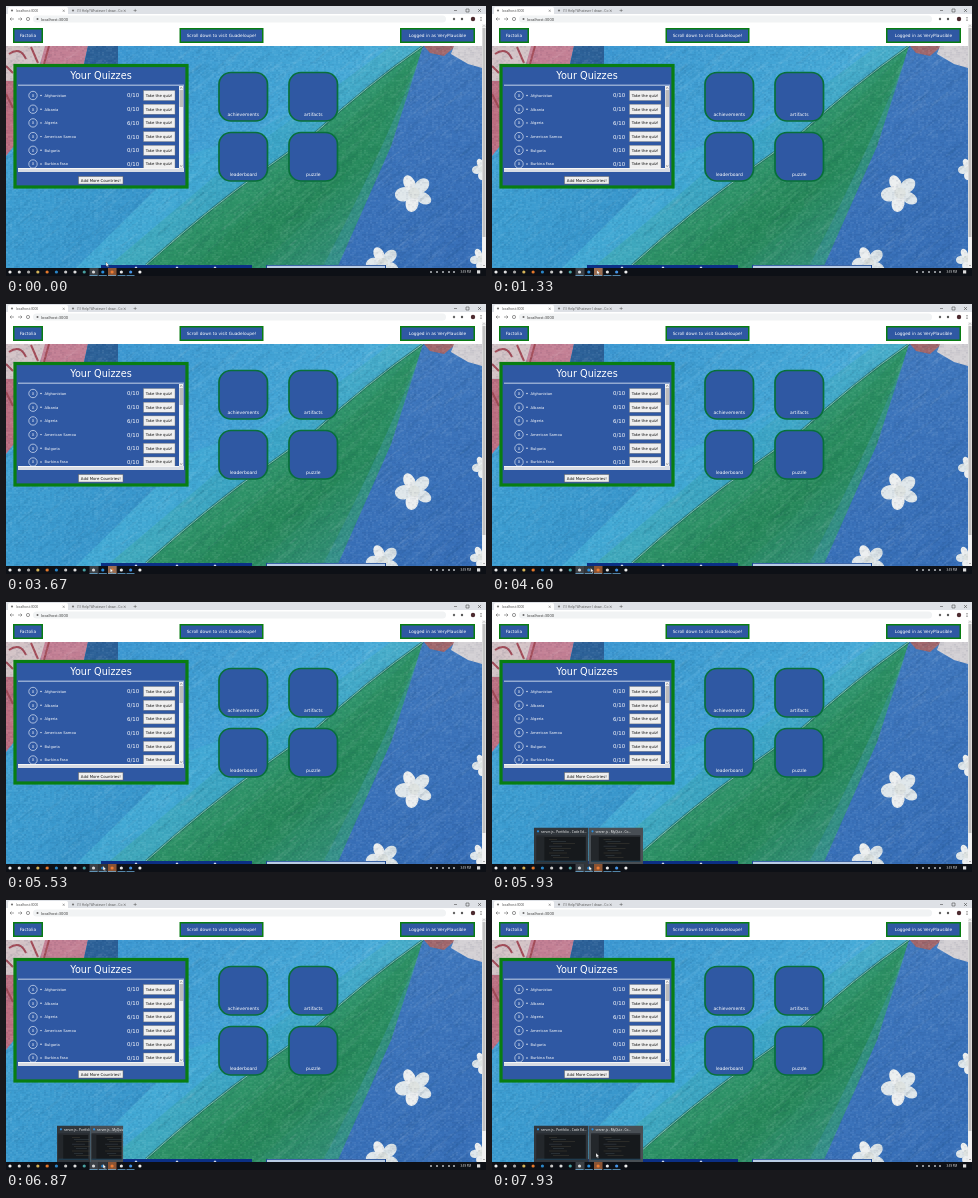
Recreate the animation shown at these times as an HTML page with a canvas. Size 480 by 270 pixels, loop 8000 ms.

```html
<!DOCTYPE html>
<html lang="en">
<head>
<meta charset="utf-8">
<title>Quiz dashboard</title>
<style>
html, body { margin: 0; width: 100%; height: 100%; overflow: hidden; background: #fff; }
canvas, body > svg { position: absolute; left: 0; top: 0; width: 100%; height: 100%; }
text { font-family: "DejaVu Sans", sans-serif; white-space: pre; }
.ui { font-family: "Open Sans", sans-serif; }
</style>
</head>
<body>
<canvas id="painting" width="480" height="270"></canvas>
<svg id="screen" viewBox="0 0 480 270" preserveAspectRatio="none"></svg>
<script>
const BLUE = '#2f58a3', GREEN = '#087d12';

// ---- painted backdrop ----
const ctx = document.getElementById('painting').getContext('2d');
let seed = 7;
const random = () => (seed = (seed * 16807) % 2147483647) / 2147483647;

function gradient(x0, y0, x1, y1, ...colors) {
  const g = ctx.createLinearGradient(x0, y0, x1, y1);
  colors.forEach((c, i) => g.addColorStop(i / (colors.length - 1), c));
  return g;
}
function shape(path, fill) {
  ctx.fillStyle = fill;
  ctx.fill(new Path2D(path));
}
function stroke(path, color, width) {
  ctx.strokeStyle = color;
  ctx.lineWidth = width;
  ctx.stroke(new Path2D(path));
}
function flower(x, y, r) {
  for (let i = 0; i < 5; i++) {
    const a = i * Math.PI * .4 + .5;
    ctx.fillStyle = i % 2 ? '#eceff0' : '#dfe7eb';
    ctx.beginPath();
    ctx.ellipse(x + Math.cos(a) * r * .55, y + Math.sin(a) * r * .55, r * .46, r * (.3 + i % 3 * .04), a, 0, 7);
    ctx.fill();
  }
  ctx.fillStyle = '#dde2e0';
  ctx.beginPath();
  ctx.arc(x, y, r * .3, 0, 7);
  ctx.fill();
}

function paint() {
  ctx.fillStyle = gradient(60, 40, 260, 262, '#3f9ed4', '#43aad6', '#3aa3cd');
  ctx.fillRect(0, 40, 476, 222);
  shape('M112 40H400L250 125L112 175Z', gradient(112, 40, 350, 120, '#3c98d2', '#46abd8'));
  shape('M0 183H150L70 262H0Z', gradient(0, 183, 110, 262, '#3d9fd3', '#3795cb'));
  // pale band, right sky and leaf
  shape('M418 40H385Q310 95 215 165L100 262H150L308 138Z', gradient(400, 45, 120, 262, '#48aecb', '#3aa4c6', '#40aabd'));
  shape('M416 40H476V262H325Z', gradient(400, 50, 470, 262, '#4079bf', '#3a72ba', '#376fb8'));
  const ridge = 'M417 40Q360 80 308 128L256 165Q200 205 140 259';
  shape(ridge + 'L138 262H331L385 140Z', gradient(290, 120, 370, 235, '#32986f', '#278a5c', '#338f78'));
  shape('M412 48Q360 100 308 146Q240 205 190 262H250Q335 190 398 82Z', '#24855455');
  shape('M414 52L385 140L331 262H316Q365 170 414 52Z', '#3a94a077');
  stroke(ridge, '#1c5f5499', 2.6);
  stroke(ridge, '#83c8b4', .9);
  // corner patches
  shape('M0 40H40L34 58H8V75H0Z', '#d3c3c6');
  shape('M39 40H82L78 58H34Z', '#c37f94');
  shape('M0 75H8V140L0 150Z', '#bc6e80');
  shape('M82 40H112V58H78Z', '#2c6198');
  stroke('M3 48Q14 40 20 53M25 41L32 57M43 40L38 58M0 60L7 67M0 88L7 102', '#a34c58', 2);
  shape('M418 40H450L438 50L424 47Z', '#a0666b');
  shape('M448 40H476V62L462 58L445 48Z', '#d3d0d4');
  flower(408, 187, 19);
  flower(377, 257, 17);
  flower(477, 163, 11);
  flower(475, 253, 11);

  // brush marks and canvas weave
  ctx.save();
  ctx.beginPath();
  ctx.rect(0, 40, 476, 222);
  ctx.clip();
  for (let i = 0; i < 900; i++) {
    const x = random() * 476, y = 40 + random() * 222, len = 5 + random() * 18;
    const color = random() < .5 ? 'rgba(255,255,255,.045)' : 'rgba(0,35,75,.045)';
    stroke(`M${x} ${y}l${-len} ${len * .8}`, color, 1 + random() * 2);
  }
  for (let y = 40; y < 262; y += 2)
    for (let x = 0; x < 476; x += 2) {
      const v = random() - .5;
      ctx.fillStyle = `rgba(${v > 0 ? '255,255,255' : '0,25,60'},${Math.abs(v) * .15})`;
      ctx.fillRect(x, y, 2, 1.5);
    }
  ctx.restore();
}

// ---- markup helpers ----
const rect = (x, y, w, h, fill, more = '') =>
  `<rect x="${x}" y="${y}" width="${w}" height="${h}" fill="${fill}" ${more}/>`;
const text = (x, y, size, label, more = '', fill = '#fff') =>
  `<text x="${x}" y="${y}" font-size="${size}" fill="${fill}" ${more}>${label}</text>`;
const dot = (x, y, r, fill) => `<circle cx="${x}" cy="${y}" r="${r}" fill="${fill}"/>`;
const line = (d, color, width = .6) =>
  `<path d="${d}" fill="none" stroke="${color}" stroke-width="${width}"/>`;
const MID = 'text-anchor="middle"';

const badge = (x, w, label) =>
  rect(x + .75, 22.75, w - 1.5, 13.5, BLUE, `stroke="${GREEN}" stroke-width="1.5"`) +
  text(x + w / 2, 31.2, 4.3, label, MID);

function browser() {
  return rect(0, 0, 480, 8, '#dee1e6') + rect(2, 1, 60, 8, '#fff', 'rx="1.5"') +
    rect(0, 8, 480, 10, '#fff') + rect(0, 18, 476, 22, '#fff') +
    dot(6, 4.5, 1.1, '#777') + text(10, 5.8, 3.3, 'localhost:3000', 'class="ui"', '#444') +
    text(56, 6, 4, '×', '', '#555') +
    dot(67, 4.5, 1.1, '#777') + text(71, 5.8, 3.3, '(1) Help! Whatever I draw - Co', 'class="ui"', '#555') +
    text(117, 6, 4, '×', '', '#555') + text(127, 6.2, 5, '+', '', '#444') +
    line('M448 4.5h3M460 3h3v3h-3zM472 3l3 3m0-3l-3 3', '#333', .5) +
    line('M8 13H4l1.5-1.5M4 13l1.5 1.5M12 13h4l-1.5-1.5M16 13l-1.5 1.5', '#666') +
    `<circle cx="22" cy="13" r="1.6" fill="none" stroke="#555" stroke-width=".6"/>` +
    rect(27, 9.5, 413, 7, '#f1f3f4', 'rx="3.5"') + dot(31.5, 13, 1, '#666') +
    text(35, 14.5, 4, 'localhost:3000', 'class="ui"', '#333') +
    dot(448, 13, 1.2, '#666') + dot(456, 13, 1.2, '#555') + dot(467, 13, 2.2, '#4d2b30') +
    [11.5, 13, 14.5].map(y => dot(475, y, .5, '#444')).join('') +
    rect(476, 18, 4, 244, '#f1f1f1') + rect(476.5, 22, 3, 209, '#c1c1c1') +
    line('M477 20.5l1-1 1 1M477 259l1 1 1-1', '#666', .5);
}

function quizPanel() {
  const scores = { Afghanistan: 0, Albania: 0, Algeria: 6, 'American Samoa': 0, Bulgaria: 0, 'Burkina Faso': 0 };
  const rows = Object.entries(scores).map(([country, score], i) => {
    const y = 89.5 + i * 13.7;
    return `<circle cx="27" cy="${y}" r="4.2" fill="none" stroke="#dce5f5" stroke-width=".7"/>` +
      text(27, y + 1.4, 3.8, 'X', MID) + dot(35, y, .7, '#fff') + text(38.5, y + 1.3, 3.7, country) +
      text(121, y + 1.9, 5.4, score + '/10') +
      rect(137.5, y - 5, 31.5, 10, '#efefef', 'stroke="#777" stroke-width=".4"') +
      text(153.2, y + 1.4, 3.85, 'Take the quiz!', MID, '#111');
  }).join('');
  return rect(9, 59.5, 172, 121.5, BLUE, `stroke="${GREEN}" stroke-width="3.2"`) +
    text(95, 73, 9.7, 'Your Quizzes', MID) +
    rect(12, 78.7, 166, .9, '#d5dff0') +
    `<svg x="12" y="79" width="161" height="83" viewBox="12 79 161 83">${rows}</svg>` +
    rect(173, 80, 4.5, 82, '#f1f1f1') + rect(173.5, 84, 3.5, 17, '#bcbcbc') +
    line('M174 82.5l1.2-1 1.2 1M174 159.5l1.2 1 1.2-1', '#555', .6) +
    rect(12, 162, 166, 4, '#d8dce4') + rect(12, 162, 161, 1, '#f5f5f5') +
    rect(72.5, 170.5, 44.5, 7.5, '#efefef', 'stroke="#666" stroke-width=".5"') +
    text(94.8, 175.7, 3.9, 'Add More Countries!', MID, '#111');
}

const tile = (x, y, label) =>
  rect(x, y, 48.5, 48.5, BLUE, 'rx="12" stroke="#08703a" stroke-width="1.7"') +
  text(x + 24.3, y + 43.3, 4.5, label, MID);

function nextSection() {
  return rect(95, 259, 151, 3, '#0b2f85') +
    [130, 171, 209].map(x => `<path d="M${x - 1.5} 262l1.5-1.7 1.5 1.7z" fill="#dce6f5"/>`).join('') +
    rect(260, 259, 120, 3, '#1c4894') + rect(261, 259.8, 118, 2.2, '#b9cce4');
}

function taskbar() {
  const icons = ['#eee', '#ddd', '#aaa', '#d5b45a', '#e5782b', '#2a86c8', '#c8c8c8', '#ddd',
    '#48a0a0', '#d8d8d8', '#2b8ede', '#ed7d35', '#e8e8e8', '#4595e8', '#f0f0f0'];
  return rect(0, 262, 480, 8, '#0d1016') +
    rect(83.5, 262, 9, 8, '#3c4147') + rect(102, 262, 8.5, 8, '#8c5433') +
    rect(0, 262, 9.2, 8, '#fff', 'id="hover" opacity=".15"') +
    icons.map((c, i) => dot(4 + i * 9.28, 266, 1.6, c)).join('') +
    [83.5, 92.8, 102, 111.5, 120.5].map(x => rect(x, 269.3, 8, .7, '#70b6e5')).join('') +
    [425, 431, 437, 443, 448].map(x => rect(x - .8, 265, 1.6, 2, '#b5b9bd', 'rx=".5"')).join('') +
    text(454.5, 267.2, 2.8, '3:39 PM', 'class="ui"') + rect(471, 264.3, 3.2, 3.2, '#ddd');
}

function pagePreview() {
  return `<g id="pagePreview">` + rect(58, 225.5, 57.5, 36.5, '#3a434b') +
    dot(62, 229.3, 1, '#b9c3cc') + text(65, 230.5, 3.2, 'localhost:3000', 'class="ui"') +
    rect(61, 233, 51, 27, '#386c8c') + rect(61, 233, 51, 4, '#68757f') +
    `<path d="M105 237L76 260H96Z" fill="#2f6c62"/>` +
    rect(62, 239, 19, 13, '#2c4c86', 'stroke="#1a5c40" stroke-width=".5"') +
    [0, 1, 2, 3].map(i => rect(84 + i % 2 * 8, 240 + (i >> 1) * 6.5, 5.5, 5.5, '#2c4c86', 'rx="1.5"')).join('') +
    '</g>';
}

function editorPreview(title, fill) {
  const code = Array.from({ length: 9 }, (_, i) =>
    rect(15 + i % 3 * 2, 11.5 + i * 2.3, 8 + i * 7 % 16, .4, i % 2 ? '#46525a' : '#4d483b')).join('');
  return `<svg class="editor" y="225.5" height="36.5">` + rect(0, 0, '100%', '100%', fill) +
    dot(4, 3.8, 1.1, '#2b8ede') + text(7, 5, 3.2, title, 'class="ui"') +
    rect('5%', 8, '90%', 26, '#16191c') + rect('5%', 8, '90%', 1.2, '#30353a') +
    rect('5%', 9.2, '14%', 24.8, '#23272b') + code + rect('5%', 33.3, '90%', .7, '#1f5070') + '</svg>';
}

paint();
const screen = document.getElementById('screen');
screen.innerHTML = browser() +
  badge(7, 30, 'Factolia') + badge(173.5, 84, 'Scroll down to visit Guadeloupe!') +
  badge(394, 75, 'Logged in as VeryPlausible') +
  quizPanel() +
  tile(213, 66.5, 'achievements') + tile(283, 66.5, 'artifacts') +
  tile(213, 126.5, 'leaderboard') + tile(283, 126.5, 'puzzle') +
  nextSection() + taskbar() + pagePreview() +
  '<g id="editors">' + editorPreview('server.js - Portfolio - Code Ed…', '#30363c') +
  editorPreview('server.js - MyQuiz - Co…', '#484e54') + '</g>' +
  `<path id="cursor" d="M0 0V4.6L1.1 3.6 1.8 5.2 2.5 4.9 1.8 3.3H3.2Z" fill="#fff" stroke="#222" stroke-width=".3"/>`;

// ---- motion: the pointer visits the editor, the browser, then the editor again ----
const LOOP = 8000;
const cursorPath = [[0, 100, 256], [250, 101, 258], [700, 105, 264], [4400, 104, 264], [5000, 88, 264],
  [5500, 97, 264], [6000, 97, 264], [6150, 88, 264.5], [6600, 88, 264.5], [6750, 97, 264],
  [7100, 97, 264], [7800, 104, 253], [LOOP, 104, 253]];
const popupEdges = [[0, 42, 151], [6080, 42, 151], [6250, 58, 115.5], [6730, 58, 115.5],
  [6870, 51, 117], [7000, 42, 151], [LOOP, 42, 151]];

function along(track, t) {
  const i = Math.max(1, track.findIndex(key => key[0] >= t));
  const [t0, a0, b0] = track[i - 1], [t1, a1, b1] = track[i];
  const k = (t - t0) / (t1 - t0);
  return [a0 + (a1 - a0) * k, b0 + (b1 - b0) * k];
}
const ramp = (t, start, duration) => Math.min(1, Math.max(0, (t - start) / duration));
const find = id => document.getElementById(id);
const page = find('pagePreview'), editors = find('editors'), cursor = find('cursor'), hover = find('hover');
const panes = [...document.querySelectorAll('.editor')];

function draw(now) {
  const t = now % LOOP;
  const [x, y] = along(cursorPath, t);
  cursor.setAttribute('transform', `translate(${x} ${y})`);
  hover.setAttribute('x', 83.4 + Math.round((x - 88) / 9.28) * 9.28);
  hover.setAttribute('visibility', y > 261 ? 'visible' : 'hidden');

  const opened = ramp(t, 5530, 170), toPage = ramp(t, 6100, 150), toEditors = ramp(t, 6760, 80);
  page.setAttribute('opacity', toPage * (1 - toEditors));
  editors.setAttribute('opacity', opened * (1 - toPage) + toEditors);
  editors.setAttribute('transform', `translate(0 ${(1 - opened) ** 2 * 6})`);

  const [left, right] = along(popupEdges, t), width = (right - left) / 2;
  panes.forEach((pane, i) => {
    pane.setAttribute('x', left + i * width);
    pane.setAttribute('width', width);
  });
  requestAnimationFrame(draw);
}
requestAnimationFrame(draw);
</script>
</body>
</html>
```
